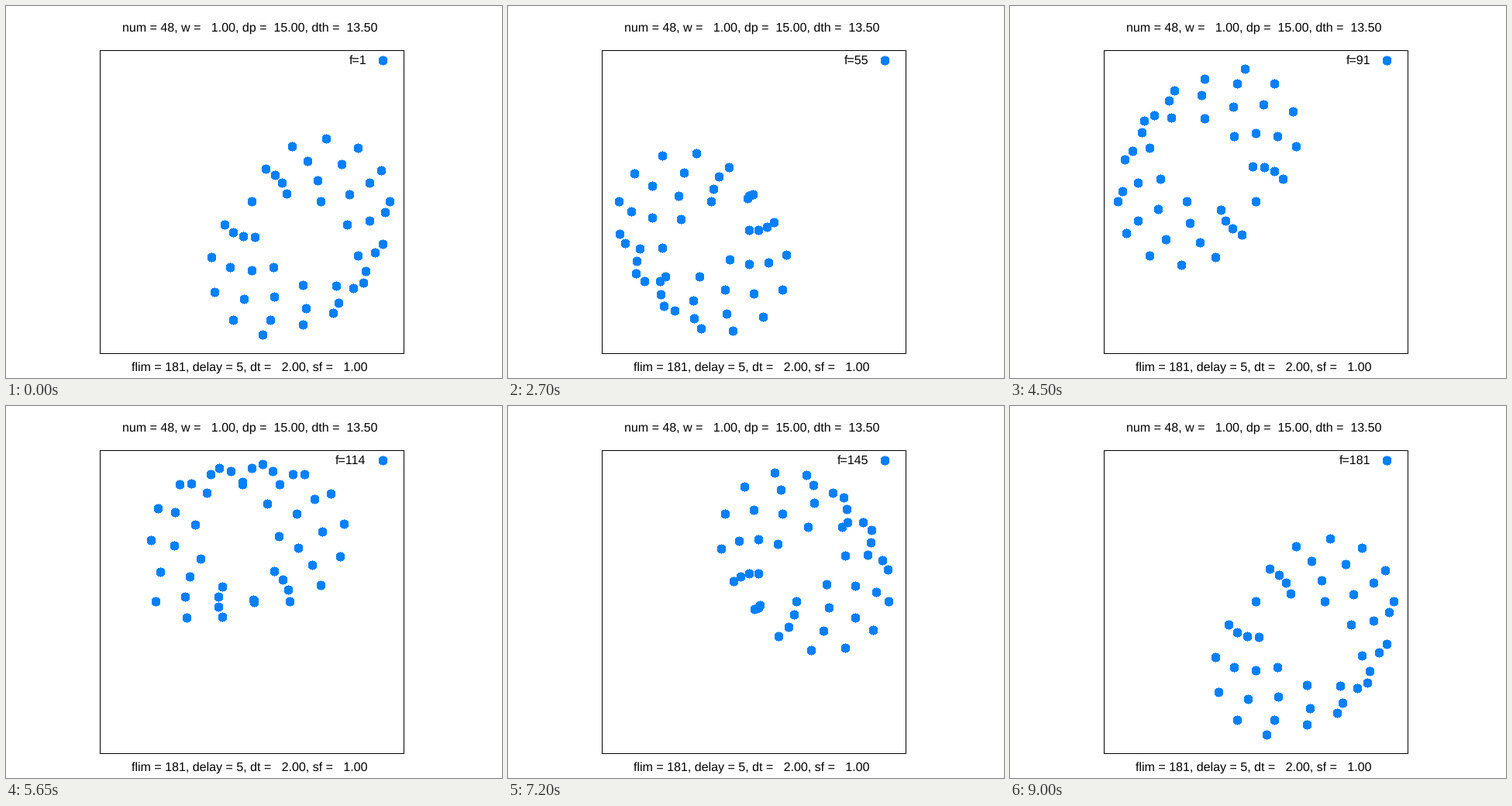
Animation, 640 px wide and 480 px high, one loop 9.05 s. Source, as a matplotlib script:

```python
import numpy as np
import matplotlib.pyplot as plt
from matplotlib.animation import FuncAnimation
from matplotlib.collections import PolyCollection
from matplotlib.patches import Rectangle

W, H, DPI = 640, 480, 100
NUM, OMEGA, DP, DTH = 48, 1.0, 15.0, 13.5
FLIM, DELAY, DT, SF = 181, 5, 2.0, 1.0
LEFT, RIGHT, TOP, BOTTOM = 121, 513, 57, 448
SPAN = 2.2  # both axes run from -1.1 to 1.1
BLUE = "#0080ff"

plt.rcParams["font.family"] = "Liberation Sans"
plt.rcParams["text.hinting"] = "none"

fig = plt.figure(figsize=(W / DPI, H / DPI), dpi=DPI, facecolor="white")
ax = fig.add_axes([0, 0, 1, 1])
ax.set_xlim(0, W)
ax.set_ylim(H, 0)
ax.axis("off")


def label(x, y, s):
    return ax.text(x, y, s, fontsize=16 * 72 / DPI, color="black",
                   ha="left", va="baseline")


def bar(x, y, w, h):
    ax.add_patch(Rectangle((x, y), w, h, facecolor="black", linewidth=0))


def dot_shape():
    """Outline of a hard-edged disc, built from the half-width of each row."""
    half = [0, 3, 4, 5, 5, 5, 5, 5, 5, 5, 4, 3, 0]
    right = []
    for row, h in enumerate(half):
        right += [(h + 1, row - 6), (h + 1, row - 5)]
    left = [(1 - x, y) for x, y in reversed(right)]
    return np.array(right + left, dtype=float)


def centres(t):
    """Pixel positions of all dots at phase t, in degrees."""
    i = np.arange(NUM)
    r = SF * np.cos(np.radians(OMEGA * t + DP * i))
    th = np.radians(DTH * i)
    sx, sy = (RIGHT - LEFT) / SPAN, (BOTTOM - TOP) / SPAN
    x = np.floor((LEFT + RIGHT) / 2 + sx * r * np.cos(th) + 0.5)
    y = np.ceil((TOP + BOTTOM) / 2 - sy * r * np.sin(th) - 0.5 - 1e-9)
    return np.column_stack([x, y])


# Frame of four one-pixel bars
for y in (TOP, BOTTOM):
    bar(LEFT, y, RIGHT - LEFT + 1, 1)
for x in (LEFT, RIGHT):
    bar(x, TOP, 1, BOTTOM - TOP + 1)

label(150, 33, f"num = {NUM}, w = {OMEGA:6.2f}, dp = {DP:6.2f}, dth = {DTH:6.2f}")
label(162, 471, f"flim = {FLIM}, delay = {DELAY}, dt = {DT:6.2f}, sf = {SF:6.2f}")
counter = label(443, 75, "f=1")

SHAPE = dot_shape()
dots = PolyCollection([], facecolor=BLUE, edgecolor="none", linewidth=0,
                      antialiased=False)
ax.add_collection(dots, autolim=False)


def draw(k):
    pts = np.vstack([centres(DT * k), [(486, 70)]])
    dots.set_verts(pts[:, None, :] + SHAPE)
    n = str(k + 1)
    counter.set_text("f=" + n)
    counter.set_x(452 - 9 * len(n))
    return dots, counter


anim = FuncAnimation(fig, draw, frames=FLIM, interval=10 * DELAY,
                     repeat=True, repeat_delay=0, blit=False)
plt.show()
```
